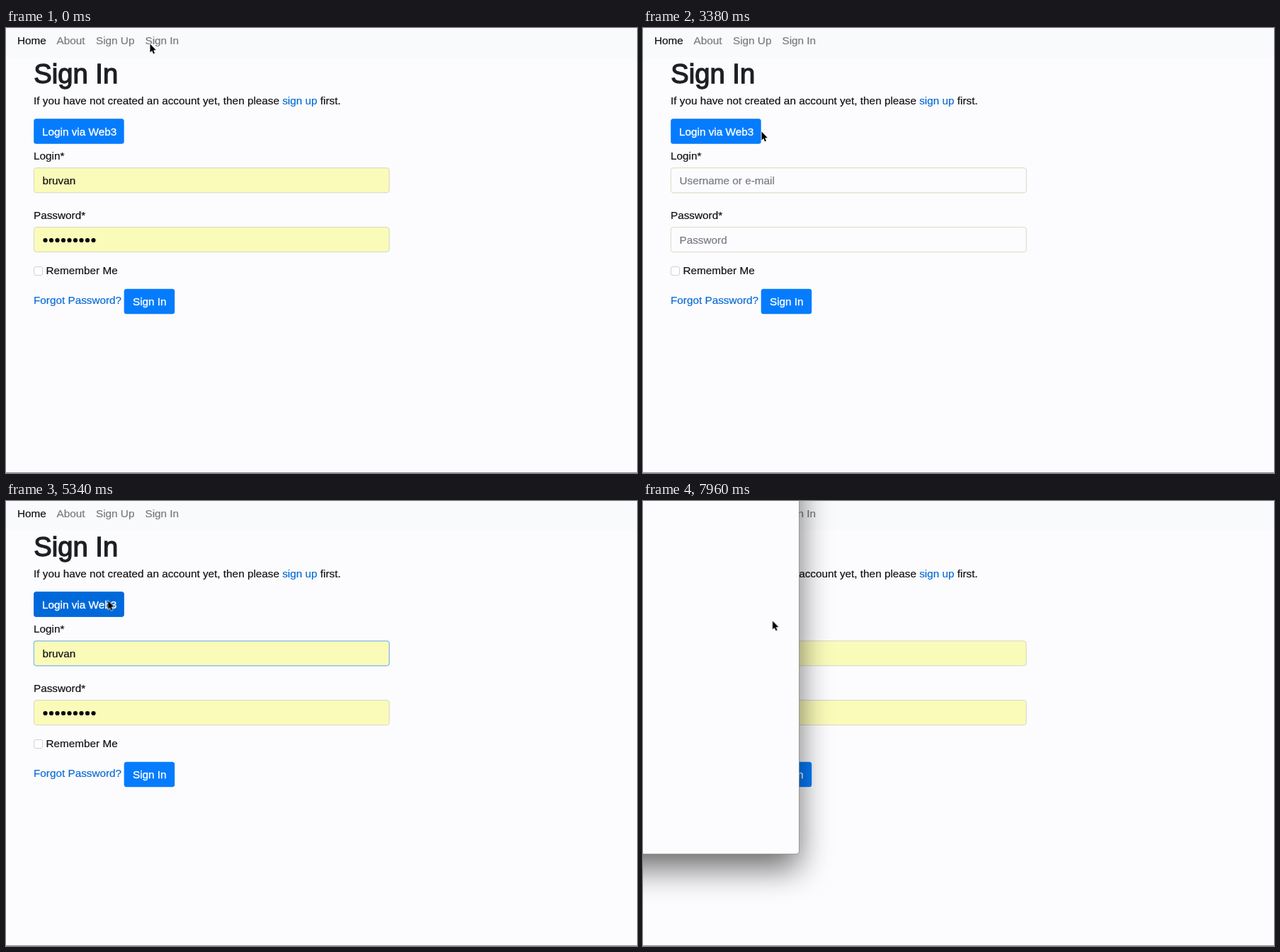
Write an HTML page that moves like this. It is 891 px wide and 629 px high and loops after 8 s.

```html
<!DOCTYPE html>
<html lang="en">
<head>
<meta charset="utf-8">
<title>Sign In</title>
<style>
html, body { margin: 0; width: 100%; height: 100%; overflow: hidden; background: #fcfcfe; }
svg { display: block; width: 100%; height: 100%; }
text {
  font: 15.3px "Liberation Sans", Arial, sans-serif;
  white-space: pre;
  color: #111;
  fill: currentColor;
  stroke: currentColor;
  stroke-width: .2;
}
.muted { color: #7a7b7e; }
.link { color: #0a6cd4; fill: currentColor; stroke: currentColor; }
.hint { color: #757b82; }
.title { font-size: 38.2px; color: #1c1f23; stroke-width: 1.3; }
.label { color: #fff; stroke-width: .35; }
.button { fill: #057cfd; }
.field { fill: #fbfbb9; stroke: #d3d6c8; }
.blank .field { fill: #fcfcfe; stroke: #dcdecd; }
.ring { fill: none; stroke: #86bdf0; stroke-width: 1.2; }
.shadow { filter: blur(23px); opacity: .58; }

/* State switches: hard cuts on one 8 s clock */
.nav-hover, .blank, .focus, .caret, .press, .popup, .hand, .arrow {
  opacity: 0;
  animation: 8s step-end infinite;
}
.nav-hover { animation-name: over-nav; }
.hand { animation-name: over-nav; }
.arrow { animation-name: off-nav; }
.blank { animation-name: blank; }
.focus { animation-name: focus; }
.press { animation-name: press; }
.popup { animation-name: popup; }
.caret { animation: blink 1s .4s step-end infinite; }
.pointer { animation: travel 8s ease-in-out infinite; }

@keyframes over-nav { 0% { opacity: 0 } 4% { opacity: 1 } 25.5%, 100% { opacity: 0 } }
@keyframes off-nav { 0% { opacity: 1 } 4% { opacity: 0 } 25.5%, 100% { opacity: 1 } }
@keyframes blank { 0% { opacity: 0 } 37.5% { opacity: 1 } 46.25%, 100% { opacity: 0 } }
@keyframes focus { 0% { opacity: 0 } 46.25% { opacity: 1 } 83.75%, 100% { opacity: 0 } }
@keyframes press { 0% { opacity: 0 } 58.5%, 100% { opacity: 1 } }
@keyframes popup { 0% { opacity: 0 } 75%, 100% { opacity: 1 } }
@keyframes blink { 0% { opacity: 1 } 50%, 100% { opacity: 0 } }
@keyframes travel {
  0% { transform: translate(203px, 22px) }
  10%, 23% { transform: translate(216.5px, 23.5px) }
  34%, 42.5% { transform: translate(167px, 146px) }
  55%, 57.5% { transform: translate(164.5px, 129px) }
  65%, 93.75% { transform: translate(143.5px, 140.5px) }
  98.5%, 100% { transform: translate(182.5px, 169px) }
}
</style>
</head>
<body>
<svg viewBox="0 0 891 629" preserveAspectRatio="none">
  <defs>
    <rect id="input" x="39.4" y="197.8" width="501.8" height="35" rx="3.5"/>
    <rect id="web-button" x="39.2" y="128.3" width="127.5" height="35.5" rx="3.5"/>
  </defs>

  <rect width="891" height="629" fill="#fcfcfe"/>
  <rect width="891" height="42" fill="#f8fafc"/>

  <text x="16" y="22.5">Home</text>
  <text class="muted" x="71.5" y="22.5">About</text>
  <text class="muted" x="127" y="22.5">Sign Up</text>
  <text class="muted" x="196.5" y="22.5">Sign In</text>
  <text class="nav-hover" x="196.5" y="22.5">Sign In</text>

  <text class="title" x="39.3" y="78">Sign In</text>
  <text x="39" y="108">If you have not created an account yet, then please <tspan class="link">sign up</tspan> first.</text>

  <use class="button" href="#web-button"/>
  <use class="press" href="#web-button" fill="#0069d9"/>
  <text class="label" x="51" y="152">Login via Web3</text>

  <text x="39" y="186">Login*</text>
  <text x="39" y="270">Password*</text>

  <use class="field" href="#input"/>
  <use class="field" href="#input" y="83.8"/>
  <text x="51.5" y="220.5">bruvan</text>
  <path d="M55.5 300h68.1" stroke="#000" stroke-width="6.2" stroke-linecap="round" stroke-dasharray="0 8.5"/>

  <g class="blank">
    <use class="field" href="#input"/>
    <use class="field" href="#input" y="83.8"/>
    <text class="hint" x="51.5" y="220.5">Username or e-mail</text>
    <text class="hint" x="51.5" y="304.5">Password</text>
  </g>

  <g class="focus">
    <use class="ring" href="#input"/>
    <path class="caret" d="M51.5 207v16" stroke="#111"/>
  </g>

  <rect x="39.5" y="337.5" width="12" height="12" rx="2.5" fill="#fff" stroke="#cfd0d3"/>
  <text x="56.5" y="348">Remember Me</text>
  <text class="link" x="39" y="390">Forgot Password?</text>
  <rect class="button" x="166.7" y="368.8" width="71.5" height="35.4" rx="3.5"/>
  <text class="label" x="179" y="392">Sign In</text>
  <path d="M0 628.5h891" stroke="#8c8c92"/>

  <g class="popup">
    <rect class="shadow" x="-200" y="-200" width="420" height="719"/>
    <rect x="-200" y="-200" width="420.5" height="699" rx="4.5" fill="#fcfcfe" stroke="#777" stroke-opacity=".65"/>
  </g>

  <g class="pointer">
    <path class="arrow" d="M.5 .5V12.5L3.2 10L5.1 14.4L7 13.6L5.2 9.3H8.9Z" stroke="#fff" stroke-width="1.3" paint-order="stroke"/>
    <g class="hand" stroke="#111" stroke-linejoin="round">
      <path d="M-1.2 1.2C-1.2-.6 1.4-.6 1.6 1V6L2 5.2C3 4.4 4.4 5 4.4 6C5.4 5.2 6.8 5.8 6.9 6.8C8 6.2 9.3 6.8 9.3 8V11C9.3 13 8 14 8 16H0C0 14-2 12-3.8 9.6C-4.8 8-3.2 6.8-2 8L-1.2 9Z" fill="#fff"/>
      <path d="M1.8 10.5v3M4 10.5v3M6.2 10.5v3" stroke-width=".8"/>
    </g>
  </g>
</svg>
</body>
</html>
```
